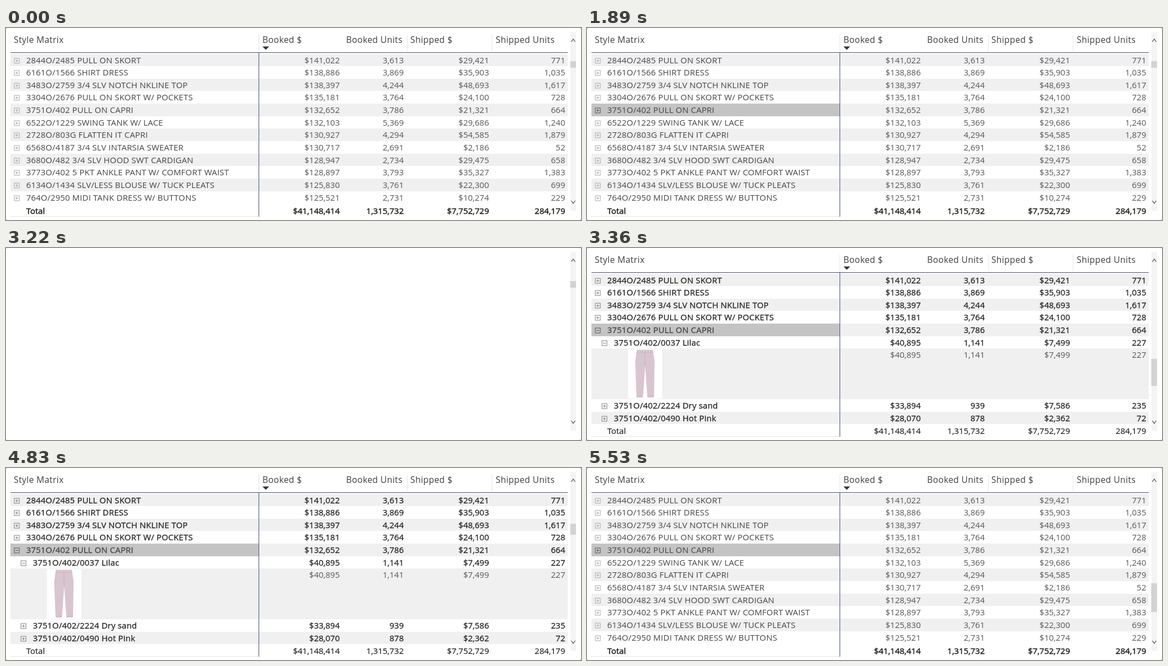
Write an HTML page with a canvas that moves like this. It is 1038 px wide and 348 px high and loops after 5600 ms.

```html
<!DOCTYPE html>
<html lang="en">
<head>
<meta charset="utf-8">
<title>Style Matrix</title>
<style>
  html, body { margin: 0; width: 100%; height: 100%; overflow: hidden; background: #808080; }
  canvas { display: block; width: 1038px; height: 348px; }
</style>
</head>
<body>
<canvas id="stage" width="1038" height="348"></canvas>
<script>
const ctx = document.getElementById('stage').getContext('2d');
const LOOP = 5600;
const ROW = 22.65, TOP = 47;
const RIGHT_EDGES = [602.5, 718, 872, 1009.5];
const DARK = '#252423', NAVY = '#3f4f6d';

const parse = text => text.trim().split('\n').map(line => line.trim().split('|'));

const styles = parse(`
  2844O/2485 PULL ON SKORT|$141,022|3,613|$29,421|771
  6161O/1566 SHIRT DRESS|$138,886|3,869|$35,903|1,035
  3483O/2759 3/4 SLV NOTCH NKLINE TOP|$138,397|4,244|$48,693|1,617
  3304O/2676 PULL ON SKORT W/ POCKETS|$135,181|3,764|$24,100|728
  3751O/402 PULL ON CAPRI|$132,652|3,786|$21,321|664
  6522O/1229 SWING TANK W/ LACE|$132,103|5,369|$29,686|1,240
  2728O/803G FLATTEN IT CAPRI|$130,927|4,294|$54,585|1,879
  6568O/4187 3/4 SLV INTARSIA SWEATER|$130,717|2,691|$2,186|52
  3680O/482 3/4 SLV HOOD SWT CARDIGAN|$128,947|2,734|$29,475|658
  3773O/402 5 PKT ANKLE PANT W/ COMFORT WAIST|$128,897|3,793|$35,327|1,383
  6134O/1434 SLV/LESS BLOUSE W/ TUCK PLEATS|$125,830|3,761|$22,300|699
  764O/2950 MIDI TANK DRESS W/ BUTTONS|$125,521|2,731|$10,274|229`);
const colours = parse(`
  3751O/402/0037 Lilac|$40,895|1,141|$7,499|227
  |$40,895|1,141|$7,499|227
  3751O/402/2224 Dry sand|$33,894|939|$7,586|235
  3751O/402/0490 Hot Pink|$28,070|878|$2,362|72`);
const total = ['Total', '$41,148,414', '1,315,732', '$7,752,729', '284,179'];
const SELECTED = 4;

// Times at which the open list grows and its thumb shrinks
const growth = [3360, 3570, 3850, 4130, 4340, 4620, 4900, 5110];

function rect(x, y, w, h, color) {
  ctx.fillStyle = color;
  ctx.fillRect(x, y, w, h);
}

function shape(points, color) {
  ctx.fillStyle = color;
  ctx.beginPath();
  points.forEach(([x, y]) => ctx.lineTo(x, y));
  ctx.fill();
}

function line(points, color, width = 1) {
  ctx.strokeStyle = color;
  ctx.lineWidth = width;
  ctx.beginPath();
  points.forEach(([x, y], i) => i ? ctx.lineTo(x, y) : ctx.moveTo(x, y));
  ctx.stroke();
}

function label(text, x, y, { size = 15, color = DARK, align = 'left', spacing = 0, weight = 0 } = {}) {
  ctx.font = `${size}px "Open Sans", "Noto Sans", sans-serif`;
  ctx.letterSpacing = spacing + 'px';
  ctx.textAlign = align;
  ctx.fillStyle = ctx.strokeStyle = color;
  ctx.fillText(text, x, y);
  if (weight) {
    ctx.lineWidth = weight;
    ctx.strokeText(text, x, y);
  }
}

function values(cells, y, color, weight) {
  cells.slice(1).forEach((cell, i) =>
    label(cell, RIGHT_EDGES[i], y, { color, weight, align: 'right' }));
}

function toggle(x, y, open, color) {
  ctx.strokeStyle = color;
  ctx.lineWidth = 1;
  ctx.strokeRect(x - 4.5, y - 4.5, 9, 9);
  line([[x - 2.5, y], [x + 2.5, y]], color);
  if (!open) line([[x, y - 2.5], [x, y + 2.5]], color);
}

function trousers() {
  rect(74, 183, 62, 90, '#fff');
  shape([[90, 184.5], [119, 184.5], [122, 206], [121, 271], [109, 271], [105, 214],
    [101, 271], [89.5, 271], [87, 206]], '#d8c5cf');
  line([[89.5, 189], [119.5, 189]], '#cbb6c1');
  line([[104.5, 189], [105, 214]], '#c5b0bc');
  line([[90, 268.5], [101, 268.5]], '#cbb6c1');
  line([[109, 268.5], [121, 268.5]], '#cbb6c1');
}

function row(cells, y, bottom, { shaded, selected, bold, open, level }) {
  if (shaded) rect(8, y, 1006, bottom - y, '#f0f0f0');
  if (selected) rect(8, y, 448, bottom - y, '#c4c4c4');
  const baseline = y + 17;
  const [name] = cells;
  if (name) {
    const strong = bold || selected;
    toggle(19.5 + level * 12, y + 12.5, open, selected ? '#555' : strong ? '#808080' : '#aaa');
    label(name, 36.5 + level * 12, baseline,
      { spacing: .2, color: bold && !selected ? DARK : '#444', weight: bold ? .3 : 0 });
  }
  const strongValues = bold && name;
  values(cells, baseline, strongValues ? DARK : '#555', strongValues ? .3 : 0);
}

function header() {
  const style = { size: 15.6, spacing: .4, color: '#3d3d3d' };
  label('Style Matrix', 14, 27, style);
  label('Booked $', 463, 27, style);
  label('Booked Units', 614, 27, style);
  label('Shipped $', 730, 27, style);
  label('Shipped Units', 884, 27, style);
  shape([[463, 33.5], [475, 33.5], [469, 39.5]], '#333');
  for (const x of [456.5, 724.5, 877.5]) line([[x, 12], [x, 42]], '#e6e6e6');
}

function table(expanded, selected) {
  header();
  let y = TOP;
  const rows = expanded ? [...styles.slice(0, SELECTED + 1), ...colours] : styles;
  rows.forEach((cells, i) => {
    const bottom = y + (cells[0] ? ROW : 91.5);
    row(cells, Math.floor(y), Math.floor(bottom), {
      shaded: i % 2 === 0,
      selected: selected && i === SELECTED,
      bold: expanded,
      open: expanded && (i === SELECTED || i === SELECTED + 1),
      level: expanded && i > SELECTED ? 1 : 0
    });
    if (!cells[0]) trousers();
    y = bottom;
  });
  const weight = expanded ? .2 : .5;
  label(total[0], 36.5, 337, { weight });
  values(total, 337, DARK, weight);
  line([[8, 44.5], [1014, 44.5]], NAVY);
  line([[456.5, 44], [456.5, 342]], NAVY);
  line([[8, 341.5], [456, 341.5]], '#e6e6e6');
}

function thumb(t) {
  if (t < 3360) return [59.5, 12];
  if (t >= 5530) return [209, 51.5];
  const steps = growth.filter(time => time <= t).length - 1;
  const height = 1 / (.0204 + .0061 * steps);
  return [34 + 3.41 * height, height];
}

function scrollbar(t) {
  rect(1019, 7, 10, 324, '#f4f4f4');
  const [y, height] = thumb(t);
  rect(1018.5, Math.round(y), 10.5, Math.round(height), '#d3d3d3');
  line([[1020.5, 25], [1024, 20], [1027.5, 25]], '#444', 1.2);
  line([[1020.5, 313], [1024, 318], [1027.5, 313]], '#444', 1.2);
}

function draw() {
  const t = performance.now() % LOOP;
  const blank = (t >= 3220 && t < 3360) || (t >= 5460 && t < 5530);
  ctx.clearRect(0, 0, 1038, 348);
  ctx.fillStyle = '#fff';
  ctx.beginPath();
  ctx.roundRect(0, 0, 1038, 348, 2);
  ctx.fill();
  if (!blank) table(t >= 3360 && t < 5460, t >= 1890);
  scrollbar(t);
  requestAnimationFrame(draw);
}
draw();
</script>
</body>
</html>
```
